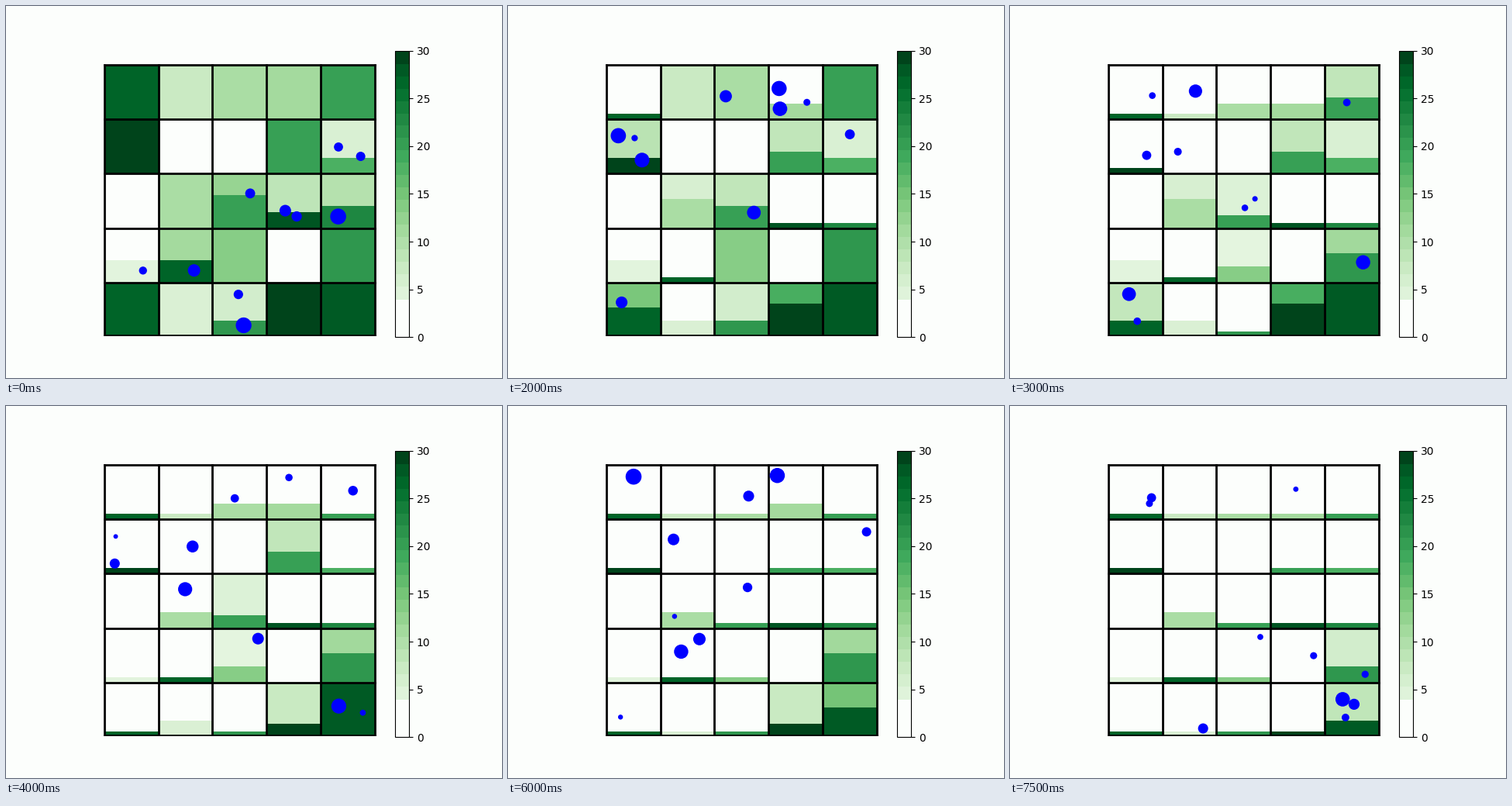
Recreate the animation shown at these times as a matplotlib script. Size 640x480 px, loop 8000 ms.

```python
import random

import numpy as np
import matplotlib.pyplot as plt
from matplotlib.animation import FuncAnimation
from matplotlib.cm import ScalarMappable
from matplotlib.colors import ListedColormap, Normalize

W, H, DPI = 640, 480, 100
PAPER = (252 / 255, 254 / 255, 252 / 255, 1)
GREENS = plt.get_cmap("Greens")
PEAK, FAINT = 30, 3.9
STEPS, HERD = 16, 10
BARE = .1
FLOOR = 426
XS = np.linspace(126.7, 475.7, 6)
YS = np.linspace(76.2, 426.8, 6)
CELL_W, CELL_H = XS[1] - XS[0], YS[1] - YS[0]

# Full stock of each field, by row.
CAPACITY = [
    [27, 7.2, 10.4, 11, 20],
    [30, 0, 0, 20, 18],
    [0, 10.4, 20, 28.4, 23],
    [4.2, 27, 13.4, 0, 21],
    [27, 5.2, 21, 30, 28],
]

# Steps at which a grazer bites, per field; the last bite leaves it bare.
BITES = [
    [[3], [6], [5, 5, 12], [4, 4, 14], [6, 8]],
    [[4, 4, 6], [], [], [2, 10], [0, 0, 7]],
    [[], [2, 8, 20], [0, 4, 6, 12], [0, 0, 2], [0, 3]],
    [[0, 7], [0, 2], [5, 5, 10], [], [5, 15, 20]],
    [[4, 6, 7], [2, 3, 9], [0, 0, 5], [3, 7, 7, 13], [11, 15, 20]],
]
CELLS = [(col, row) for row in range(5) for col in range(5)]


def share_left(col, row, step):
    bites = BITES[row][col]
    if not bites:
        return 1
    eaten = sum(when <= step for when in bites) / len(bites)
    return 1 - (1 - BARE) * eaten ** .6


def herd_at(step):
    """Grazers stand on the fields they bite; the others roam anywhere."""
    step = 0 if step == 1 else step
    rng = random.Random(step)
    spots = [cell for cell in CELLS for when in BITES[cell[1]][cell[0]] if when == step]
    spots += rng.choices(CELLS, k=HERD - len(spots))
    return np.array([(XS[col] + CELL_W * rng.uniform(.15, .85),
                      YS[row] + CELL_H * rng.uniform(.15, .85),
                      rng.uniform(2.8, 10.4)) for col, row in spots])


def shade(value):
    return PAPER if value < FAINT else GREENS(value / PEAK)


def banded(value, bands=20):
    size = (PEAK - FAINT) / bands
    band = int((value - FAINT) / size)
    if value < FAINT or band >= bands - 1:
        return shade(0 if value < FAINT else PEAK)
    return shade(FAINT + size * (band + .5))


fig = plt.figure(figsize=(W / DPI, H / DPI), dpi=DPI, facecolor=PAPER)
ax = fig.add_axes([0, 1 - FLOOR / H, 1, FLOOR / H])
ax.set(xlim=(0, W), ylim=(FLOOR, 0))
ax.axis("off")

bar_ax = fig.add_axes([501.6 / W, .11, 18.48 / W, .77])
bar_map = ListedColormap([banded(v) for v in np.linspace(0, PEAK, 370)])
fig.colorbar(ScalarMappable(Normalize(0, PEAK), bar_map), cax=bar_ax)


def add_block(col, row, color):
    return ax.add_patch(plt.Rectangle((XS[col], YS[row]), CELL_W, CELL_H,
                                      lw=0, fc=color))


fields = {}
for col, row in CELLS:
    fields[col, row] = (add_block(col, row, PAPER),
                        add_block(col, row, shade(CAPACITY[row][col])))

lines_y = np.minimum(YS, FLOOR - 1)
pen = dict(color="black", lw=2, zorder=3, solid_capstyle="projecting")
for x in XS:
    ax.plot([x, x], lines_y[[0, -1]], **pen)
for y in lines_y:
    ax.plot(XS[[0, -1]], [y, y], **pen)

grazers = ax.scatter([0] * HERD, [0] * HERD, color="blue", linewidths=0, zorder=4)


def draw(step):
    for (col, row), (top, strip) in fields.items():
        share = share_left(col, row, step)
        top.set_facecolor(shade(share * CAPACITY[row][col]))
        strip.set_y(YS[row + 1] - share * CELL_H)
        strip.set_height(share * CELL_H)
    herd = herd_at(step)
    grazers.set_offsets(herd[:, :2])
    grazers.set_sizes((2 * herd[:, 2] * 72 / DPI) ** 2)
    return [grazers]


anim = FuncAnimation(fig, draw, frames=STEPS, interval=500, repeat=True,
                     repeat_delay=0)
plt.show()
```
